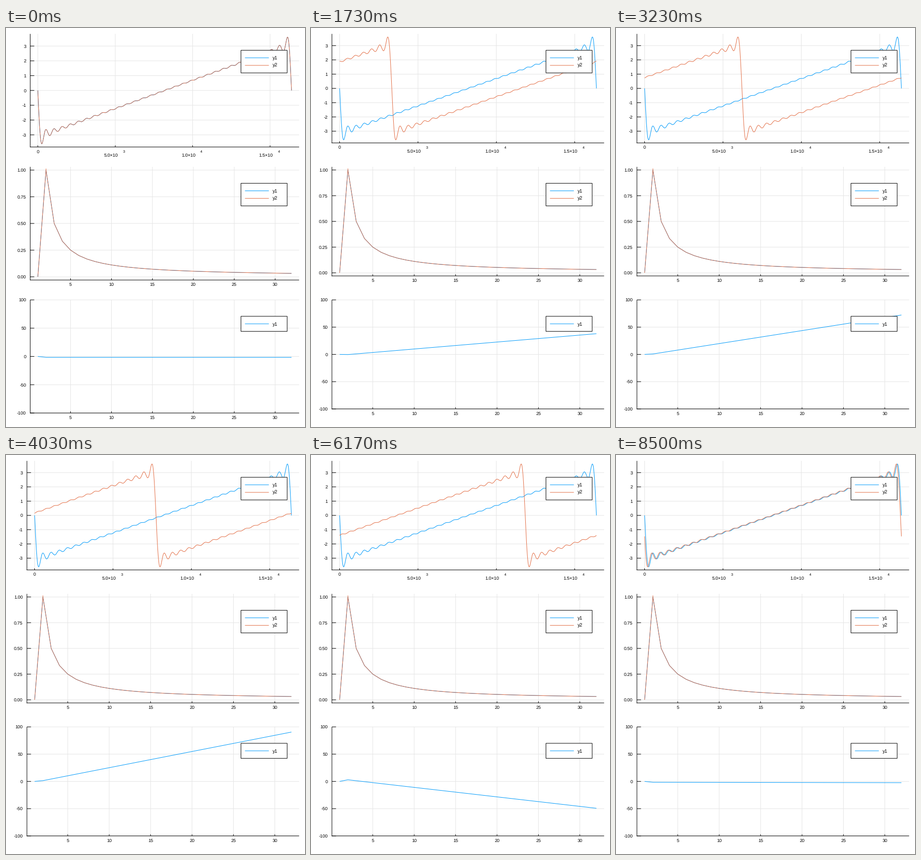
Animation, 600 px wide and 800 px high, one loop 8530 ms. Source, as a matplotlib script:

```python
import numpy as np
import matplotlib.pyplot as plt
from matplotlib.animation import FuncAnimation
from matplotlib.collections import LineCollection
from matplotlib.patches import Rectangle

W, H, DPI = 600, 800, 100
STEPS, LOOP_MS = 256, 8530
TICKS = 2 * STEPS                   # two ticks per step of the shift
PX = 72 / DPI                       # points per pixel
BLUE, ORANGE, GRID = "#009afa", "#e36f47", "#e5e5e5"
SAMPLES, BINS, POINTS = 16384, 32, 1024
PITCH, TOP, RIGHT = H / 3, 11.81, 588.19

plt.rcParams.update({"font.family": "Liberation Sans", "text.hinting": "none"})

harmonics = np.arange(1, BINS)
bins = np.arange(1, BINS + 1)
spectrum = np.r_[0, 1 / harmonics]


def wave(t):
    """Band-limited sawtooth with period 1."""
    return -2 * np.sin(2 * np.pi * np.outer(t, harmonics)) @ (1 / harmonics)


def wrap(turns):
    return (turns + 0.5) % 1 - 0.5


def phase(shift):
    """Unwrapped phase of each bin for a shift given in periods."""
    line = wrap(shift - 0.25) + wrap(shift) * (harmonics - 1)
    return np.r_[0, 2 * np.pi * line]


period = wave(np.arange(POINTS) / POINTS)
times = np.linspace(0, SAMPLES, POINTS + 1)


def shifted(step):
    y = np.roll(period, step * POINTS // STEPS)
    return np.append(y, y[0])


PEAK = 1.06 * wave([1 - 0.5 / BINS])[0]
X_TIME = (-0.03 * SAMPLES, 1.03 * SAMPLES)
X_BINS = (1 - 0.03 * (BINS - 1), BINS + 0.03 * (BINS - 1))

# x limits, y limits, x ticks, y ticks, y label format
PANELS = [
    (X_TIME, (-PEAK, PEAK), range(0, 15001, 5000), range(-3, 4), "{:d}"),
    (X_BINS, (-0.03, 1.03), range(5, 31, 5), np.arange(5) / 4, "{:.2f}"),
    (X_BINS, (-100, 100), range(5, 31, 5), range(-100, 101, 50), "{:d}"),
]

fig = plt.figure(figsize=(W / DPI, H / DPI), dpi=DPI, facecolor="white")
ax = fig.add_axes([0, 0, 1, 1])
ax.set_xlim(0, W)
ax.set_ylim(H, 0)
ax.axis("off")


def segments(segs, color, z):
    lines = LineCollection(segs, colors=color, linewidths=PX, zorder=z)
    lines.set_snap(False)
    return ax.add_collection(lines, autolim=False)


def label(x, y, s, ha="center", size=9.2, z=2):
    return ax.text(x, y + 0.35 * size, s, ha=ha, va="baseline",
                   fontsize=size * PX, color="black", zorder=z)


def stroke(color, z=3):
    line, = ax.plot([], [], color=color, lw=PX, zorder=z,
                    solid_joinstyle="miter", solid_capstyle="butt")
    line.set_snap(False)
    return line


class Layout:
    """Axes, grid and labels of the three panels for one set of margins."""

    def __init__(self, left, height):
        self.left, self.height = left, height
        self.artists = []
        for i in range(3):
            self.draw_panel(i)

    def to_px(self, i, x, y):
        (x0, x1), (y0, y1) = PANELS[i][:2]
        px = self.left + (np.asarray(x) - x0) / (x1 - x0) * (RIGHT - self.left)
        top = TOP + i * PITCH
        return px, top + (y1 - np.asarray(y)) / (y1 - y0) * self.height

    def draw_panel(self, i):
        xlim, ylim, xticks, yticks, fmt = PANELS[i]
        top, left = TOP + i * PITCH, self.left
        bottom = top + self.height
        tick_x, tick_y = 0.015 * (RIGHT - left), 0.015 * self.height
        grid = []
        axis = [[(left, top), (left, bottom + 0.5)],
                [(left - 0.5, bottom), (RIGHT, bottom)]]
        add = self.artists.append

        for v in xticks:
            x = self.to_px(i, v, 0)[0]
            grid.append([(x, top), (x, bottom)])
            axis.append([(x, bottom), (x, bottom - tick_y)])
            y = bottom + 8.6
            if v >= 1000:
                power = int(np.log10(v))
                add(label(x - 8.4, y + 7.6, f"{v / 10**power:.1f}×10"))
                add(label(x + 17.7, y, str(power), size=7.2))
            else:
                add(label(x, y, str(v)))
        for v in yticks:
            y = self.to_px(i, xlim[0], v)[1]
            grid.append([(left, y), (RIGHT, y)])
            axis.append([(left, y), (left + tick_x, y)])
            add(label(left - 8.3, y, fmt.format(v), ha="right"))

        add(segments(grid, GRID, 1))
        add(segments(axis, "black", 2))

    def show(self, on):
        for a in self.artists:
            a.set_visible(on)


def legend(i, colors):
    row, x0, x1 = 15.12, 471.5, 564.2
    top = TOP + i * PITCH + 48 - row
    box = Rectangle((x0, top), x1 - x0, row * (len(colors) + 1), fc="white",
                    ec="black", lw=PX, zorder=5)
    box.set_snap(False)
    ax.add_patch(box)
    for k, color in enumerate(colors, 1):
        y = top + k * row
        stroke(color, 6).set_data([479.5, 527.5], [y, y])
        label(535.3, y, f"y{k}", ha="left", size=9.6, z=6)


first = Layout(48.6, 226.8)
rest = Layout(42.0, 218.6)
for i, colors in enumerate([(BLUE, ORANGE), (BLUE, ORANGE), (BLUE,)]):
    legend(i, colors)

time_1, time_2 = stroke(BLUE), stroke(ORANGE)
mag_1, mag_2 = stroke(BLUE), stroke(ORANGE)
tip = stroke(ORANGE)
angle = stroke(BLUE)


def update(tick):
    step = min((tick + 1) // 2, STEPS - 1)
    lay = rest if step else first
    first.show(lay is first)
    rest.show(lay is rest)
    time_1.set_data(*lay.to_px(0, times, shifted(0)))
    time_2.set_data(*lay.to_px(0, times, shifted(step)))
    for line in (mag_1, mag_2):
        line.set_data(*lay.to_px(1, bins, spectrum))
    x, y = lay.to_px(1, 2, 1)
    tip.set_data([x, x], [y + 1, y - 3])
    angle.set_data(*lay.to_px(2, bins, phase(step / STEPS)))
    return time_1, time_2, mag_1, mag_2, tip, angle


anim = FuncAnimation(fig, update, frames=TICKS, init_func=lambda: update(0),
                     interval=LOOP_MS / TICKS, repeat=True, repeat_delay=0,
                     blit=False)
plt.show()
```
